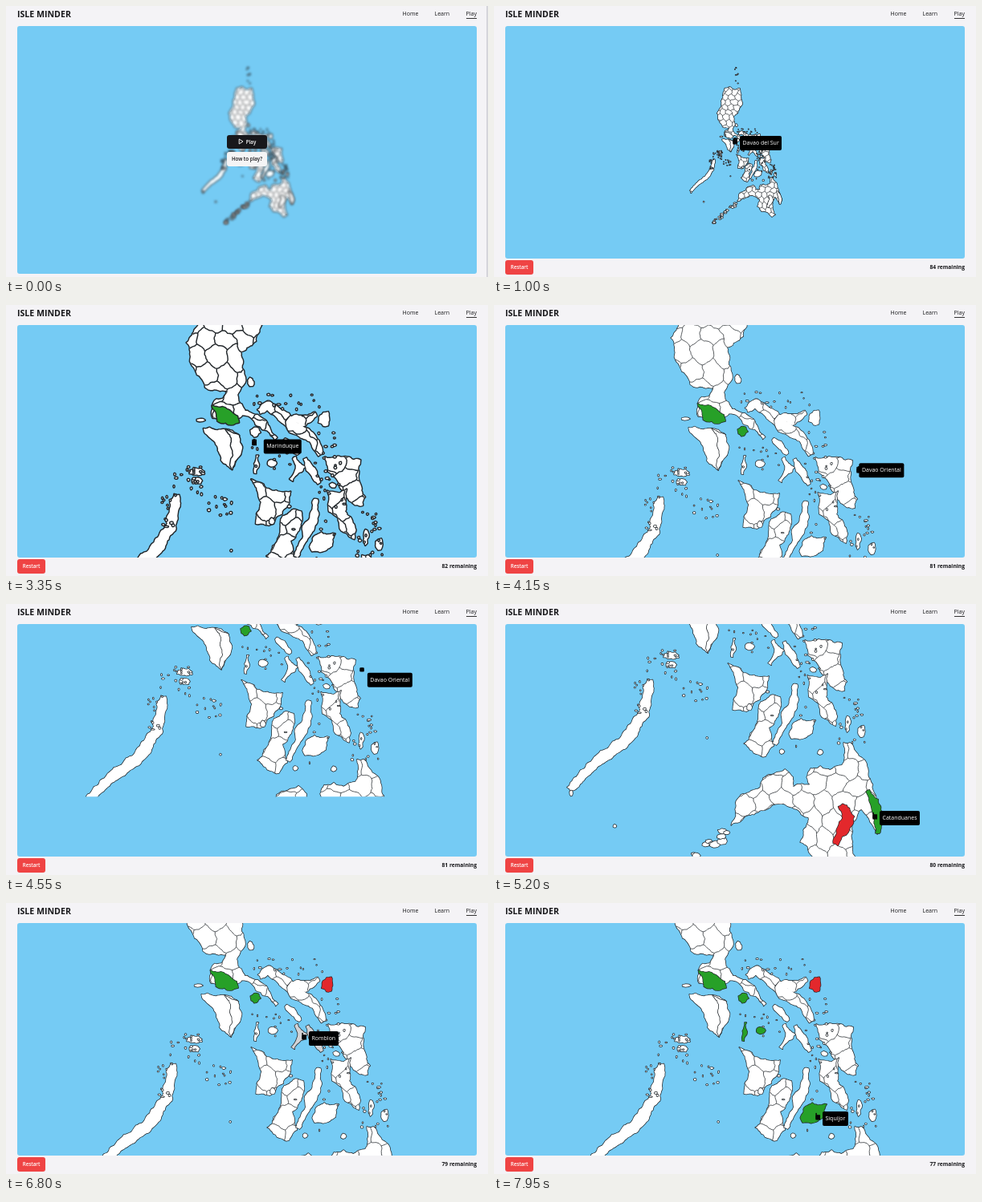
An HTML page with a canvas for the animation above (8000 ms loop, 600 by 338 pixels).

```html
<!DOCTYPE html>
<html lang="en">
<head>
<meta charset="utf-8">
<title>Isle Minder</title>
<style>
  html, body { margin: 0; width: 100%; height: 100%; overflow: hidden; background: #f4f3f6; }
  body { font: 7px/10px "Open Sans", "Noto Sans", sans-serif; color: #18181b; }
  canvas { position: absolute; left: 0; top: 0; width: 600px; height: 338px; }
  body > div { position: absolute; white-space: nowrap; }
  .title { left: 14px; top: 3px; font-size: 10.6px; line-height: 14px; font-weight: 700; }
  .nav { top: 5px; }
  .rule { left: 573px; top: 15px; width: 13px; height: 1px; background: #333; }
  .button { box-sizing: border-box; border-radius: 3px; height: 17.5px; line-height: 17.5px; text-align: center; font-weight: 600; font-size: 6.2px; }
  .restart { left: 14px; top: 317px; width: 35px; background: #ef4444; color: #fff; }
  .play { left: 275px; top: 160.5px; width: 50px; padding-left: 10px; background: #18181b; color: #fff; }
  .play svg { position: absolute; left: 14px; top: 4.5px; }
  .how { left: 275px; top: 182px; width: 50px; background: #f4f4f5; }
  .count { right: calc(100% - 586px); top: 321px; font-weight: 700; font-size: 6.7px; }
  .label { left: 0; top: 0; height: 17.5px; line-height: 17.5px; padding: 0 3.5px; border-radius: 2px; background: #000; color: #fff; }
  .edge { left: 598px; top: 0; width: 2px; height: 338px; background: #d5d5da; }
</style>
</head>
<body>
<canvas id="map"></canvas>
<div class="title">ISLE MINDER</div>
<div class="nav" style="left:493.5px">Home</div>
<div class="nav" style="left:533.5px">Learn</div>
<div class="nav" style="left:572.5px">Play</div>
<div class="rule"></div>
<div class="button restart game">Restart</div>
<div class="count game" id="count"></div>
<div class="label game" id="label"></div>
<div class="button play intro"><svg width="7" height="8"><path d="M1.2 1 L6 4 L1.2 7 Z" fill="none" stroke="#fff" stroke-width=".9" stroke-linejoin="round"/></svg>Play</div>
<div class="button how intro">How to play?</div>
<div class="edge intro"></div>
<script>
const LOOP = 8000, START = 600, TOTAL = 84, LAG = 50, ZOOM_TIME = 270;
const GREEN = '#27a028', RED = '#e3282c', SEA = '#75cbf4';
const canvas = document.getElementById('map'), ctx = canvas.getContext('2d');
const count = document.getElementById('count'), label = document.getElementById('label');
const dpr = window.devicePixelRatio || 1;
canvas.width = 600 * dpr;
canvas.height = 338 * dpr;

let seed = 7;
const rnd = () => (seed = seed * 16807 % 2147483647) / 2147483647;
const spread = size => (rnd() - .5) * size;

// Outline makers: key points, a tapered band along a spine, an uneven ellipse.
const ring = text => text.trim().split(/\s+/).map(p => p.split(',').map(Number));
function band(text, width) {
  const spine = ring(text), last = spine.length - 1, left = [], right = [];
  spine.forEach(([x, y], i) => {
    const a = spine[Math.max(0, i - 1)], b = spine[Math.min(last, i + 1)];
    const dx = b[0] - a[0], dy = b[1] - a[1];
    const w = width * (.4 + .6 * Math.sin(Math.PI * i / last)) / Math.hypot(dx, dy);
    left.push([x - dy * w, y + dx * w]);
    right.unshift([x + dy * w, y - dx * w]);
  });
  return left.concat(right);
}
function blob(x, y, rx, ry = rx) {
  return Array.from({ length: 7 }, (_, i) => {
    const a = i * Math.PI * 2 / 7, d = .8 + rnd() * .4;
    return [x + rx * d * Math.cos(a), y + ry * d * Math.sin(a)];
  });
}

// Midpoint displacement gives the ragged shore.
function shore(path, x, y, u, v) {
  const len = Math.hypot(u - x, v - y);
  if (len < 4) return path.lineTo(u, v);
  const size = Math.min(.3 * len, 5);
  const mx = (x + u) / 2 + spread(size), my = (y + v) / 2 + spread(size);
  shore(path, x, y, mx, my);
  shore(path, mx, my, u, v);
}
function outline(points) {
  const path = new Path2D();
  path.moveTo(...points[0]);
  points.forEach((p, i) => shore(path, ...p, ...points[(i + 1) % points.length]));
  path.closePath();
  return path;
}
const isles = [];
const isle = (name, split, ...rings) => isles.push({ name, split, parts: rings.map(outline) });
function scatter(x, y, w, h, n) {
  while (n--) isle('', false, blob(x + spread(w), y + spread(h), .4 + rnd() * rnd() * 2, .3 + rnd()));
}

isle('Luzon', true,
  ring(`255,-104 275,-111 299,-97 320,-104 330,-35 312,0 292,14 298,54 288,70 298,90 286,105 256,100
    256,82 270,74 275,64 246,60 228,30 222,2 238,-22 240,-50 248,-70`),
  band('290,92 312,100 324,112 338,127', 5),
  band('316,92 328,84 350,100 364,114 384,126 396,148', 8),
  band('350,102 372,104 390,95', 7));
isle('Batangas', false, ring('255,84 272,87 288,98 290,106 280,109 262,104'));
isle('Mindoro', false, ring('244,114 273,115 290,123 292,148 281,167 270,159 262,137'));
isle('Mindoro', false, ring('273,115 290,123 292,148 281,167 280,133'));
isle('', false, blob(240, 103, 5, 2));
isle('', false, blob(305, 53, 4, 6));
isle('Marinduque', false, blob(311, 119, 6));
isle('Romblon', false, band('314,149 313,160 311,172', 3), blob(333, 159, 5, 4));
isle('Catanduanes', false, blob(401, 101, 7, 10));
isle('Masbate', false, band('362,152 370,163 358,181', 6), band('376,153 382,166 394,185', 5));
isle('', false, band('349,128 358,136 367,147', 4));
isle('Palawan', false, band('108,337 131,315 150,297 168,283 188,262 201,244 205,224 209,200', 8));
isle('', false, blob(111, 342, 2, 4));
isle('', false, blob(235, 170, 9, 5));
isle('', false, blob(235, 182, 7, 4));
isle('Panay', true, ring('306,180 333,195 357,196 355,207 346,225 329,240 312,238 313,225 319,210'));
isle('', false, blob(333, 235, 3, 4));
isle('Negros', true, ring('347,228 359,220 371,222 371,236 357,260 363,283 353,296 341,293 326,280 343,252'));
isle('Cebu', false, band('390,206 388,226 378,250 364,281', 6));
isle('Bohol', false, ring('382,268 387,255 397,249 415,251 411,267 402,273 385,274'));
isle('Siquijor', false, blob(373, 290, 3));
isle('Camiguin', false, blob(421, 291, 3));
isle('Samar', true, ring('402,151 431,151 448,155 446,170 454,203 451,214 438,211 421,190 416,178 406,170'));
isle('Leyte', true, ring('405,195 421,198 430,193 428,222 442,246 440,258 423,247 419,230 407,222'));
isle('', false, blob(412, 188, 4, 3));
isle('', false, blob(455, 255, 3, 11));
isle('', false, blob(472, 265, 4, 8));
isle('Mindanao', true, ring(`315,362 322,344 346,335 350,323 377,312 387,322 387,334 408,331 404,322 409,311
  421,308 433,313 448,307 450,279 458,279 473,298 484,328 490,345 499,379 492,393 472,362 461,379 461,410
  472,438 458,448 437,427 413,424 396,403 406,372 375,355 334,369 310,382`));
isle('Davao Oriental', false, band('480,339 488,352 494,370 492,392', 6));
isle('Davao del Sur', false, band('446,357 456,372 450,386 440,406', 8));

scatter(305, -160, 16, 70, 8);
scatter(350, 80, 90, 22, 16);
scatter(265, 214, 32, 26, 12);
scatter(225, 182, 40, 40, 22);
scatter(198, 222, 20, 46, 14);
scatter(330, 150, 60, 44, 12);
scatter(405, 160, 34, 90, 24);
scatter(460, 250, 34, 60, 22);
scatter(390, 245, 80, 80, 10);
isle('', false, blob(280, 273, 1));
isle('', false, blob(165, 383, 2));
for (let i = 0; i < 28; i++) {
  const p = i / 27, r = 2 + rnd() * 5;
  isle('', false, blob(206 + 100 * p + spread(16), 474 - 88 * p + spread(16), r, r * .6));
}

// Province borders: a shaken honeycomb, shown only on the larger isles.
const borders = new Path2D();
const shake = n => (Math.sin(n * 12.99) * 43758.5 % 1) * 5;
const knot = (i, j) => [
  206 + i * 13 + shake(i + j * 57),
  -120 + j * 22 + ((i + j) % 2 ? 4 : -4) + shake(i * 31 + j + .5)
];
for (let i = 0; i < 24; i++) for (let j = 0; j < 27; j++) {
  const ends = (i + j) % 2 ? [knot(i + 1, j), knot(i, j + 1)] : [knot(i + 1, j)];
  for (const end of ends) {
    borders.moveTo(...knot(i, j));
    shore(borders, ...knot(i, j), ...end);
  }
}

// Time, place asked for, colour it gets.
const turns = [
  [1600, 'Davao del Sur', RED], [2900, 'Batangas', GREEN], [3750, 'Marinduque', GREEN],
  [5200, 'Davao Oriental', GREEN], [6400, 'Catanduanes', RED], [7250, 'Romblon', GREEN],
  [7720, 'Bohol', GREEN], [Infinity, 'Siquijor', GREEN]
];
const zooms = [{ from: 2290, scale: .5 }, { from: 3160, scale: 1 }];
const moves = [];
const move = (from, to, x, y, more) => moves.push({ from, to, x, y, bend: 0, ...more });
move(0, 1, 300, 169);
move(1200, 1500, 338, 235);
move(1700, 1950, 347, 259);
move(2100, 2280, 281, 165);
move(2650, 2850, 300, 159);
move(2950, 3130, 330, 181);
move(3230, 3400, 307, 171);
move(3450, 3650, 308, 158);
move(3900, 4150, 454, 206);
move(4206, 4761, 441, 61, { drag: true });
move(4850, 5100, 474, 265);
move(5400, 5700, 493, 139);
move(5772, 6007, 507, 245, { drag: true, bend: 28 });
move(6200, 6350, 420, 180);
move(6500, 6700, 371, 167);
move(6950, 7150, 332, 160);
move(7350, 7600, 403, 267);
const drags = moves.filter(m => m.drag);

const easeOut = p => 1 - (1 - Math.max(0, Math.min(1, p))) ** 2;
function pointer(t) {
  let x = 0, y = 0;
  for (const m of moves) {
    if (t < m.from) break;
    const e = easeOut((t - m.from) / (m.to - m.from));
    x += (m.x - x) * e + m.bend * 4 * e * (1 - e);
    y += (m.y - y) * e;
  }
  return [x, y];
}
function dragged(drag, t) {
  const a = pointer(drag.from), b = pointer(Math.min(t, drag.to));
  return [b[0] - a[0], b[1] - a[1]];
}

// Zooms hold the point under the pointer; drags follow the pointer.
function viewAt(t) {
  let s = .29, x = 213.2, y = 133.1, drawn = s;
  for (const z of zooms.filter(z => t >= z.from)) {
    const [px, py] = pointer(z.from), p = (t - z.from) / ZOOM_TIME;
    const next = s + (z.scale - s) * easeOut(p), k = next / s;
    x = px + (x - px) * k;
    y = py + (y - py) * k;
    s = next;
    if (p >= 1) drawn = s;
  }
  for (const d of drags.filter(d => t >= d.from)) {
    const [dx, dy] = dragged(d, t);
    x += dx;
    y += dy;
  }
  return { s, x, y, drawn };
}

function drawMap(t, pos, drag) {
  const playing = t >= START;
  const { s, x, y, drawn } = viewAt(t);
  ctx.save();
  ctx.beginPath();
  ctx.roundRect(14, 25, 572, playing ? 290 : 309, 3);
  ctx.clip();
  ctx.fillStyle = SEA;
  ctx.fillRect(14, 25, 572, 310);
  if (drag) {
    // Only a margin around the old view is drawn until the drag ends.
    const [dx, dy] = dragged(drag, t), pad = 49.5;
    ctx.beginPath();
    ctx.rect(14 - 2 * pad + dx, 25 - pad + dy, 572 + 4 * pad, 290 + 2 * pad);
    ctx.clip();
  }
  if (!playing) ctx.filter = `blur(${1.5 * dpr}px)`;
  ctx.translate(x, y);
  ctx.scale(s, s);
  ctx.lineJoin = 'round';
  ctx.strokeStyle = '#22272b';
  let hover = false;
  const paint = (land, fill) => {
    ctx.fillStyle = fill;
    ctx.lineWidth = 1.5 / drawn;
    land.parts.forEach(p => ctx.stroke(p));
    land.parts.forEach(p => ctx.fill(p));
    if (!land.split) return;
    ctx.lineWidth = .75 / drawn;
    for (const part of land.parts) {
      ctx.save();
      ctx.clip(part);
      ctx.stroke(borders);
      ctx.restore();
    }
  };
  const marked = [];
  for (const land of isles) {
    const turn = turns.find(k => k[1] === land.name && t >= k[0]);
    const over = playing && !drag && land.name && !land.split &&
      land.parts.some(p => ctx.isPointInPath(p, pos[0] * dpr, pos[1] * dpr));
    hover = hover || over;
    if (turn) marked.push([land, turn[2]]);
    else paint(land, over ? '#d3d3d5' : '#fff');
  }
  marked.forEach(args => paint(...args));
  ctx.restore();
  return hover;
}

function drawHand([x, y], hover, drag) {
  ctx.save();
  ctx.translate(x, y);
  ctx.fillStyle = ctx.strokeStyle = '#050505';
  ctx.lineCap = 'round';
  ctx.lineWidth = 1.5;
  ctx.beginPath();
  ctx.roundRect(-2.6, -2.4, 5.6, 5.2, 1.4);
  ctx.fill();
  for (let i = 0; i < 4 && !drag; i++) {
    const tip = hover ? (i ? -2 : -4.5) : -3.5 - Math.sin(i);
    ctx.beginPath();
    ctx.moveTo(-1.9 + i * 1.4, 3);
    ctx.lineTo(-1.9 + i * 1.4, tip);
    ctx.stroke();
  }
  ctx.restore();
}

function show(kind, on) {
  document.querySelectorAll('.' + kind).forEach(e => e.style.visibility = on ? 'visible' : 'hidden');
}

const begin = performance.now();
function frame() {
  const t = (performance.now() - begin) % LOOP;
  const playing = t >= START;
  const pos = pointer(t), drag = drags.find(d => t >= d.from && t < d.to);
  ctx.setTransform(dpr, 0, 0, dpr, 0, 0);
  ctx.clearRect(0, 0, 600, 338);
  const hover = drawMap(t, pos, drag);
  if (playing) drawHand(pos, hover, drag);
  show('game', playing);
  show('intro', !playing);
  const done = turns.filter(k => t >= k[0]).length;
  count.textContent = `${TOTAL - done} remaining`;
  label.textContent = turns[done][1];
  const [lx, ly] = pointer(t - LAG);
  label.style.transform = `translate(${lx + 6}px, ${ly - 7}px)`;
  requestAnimationFrame(frame);
}
frame();
</script>
</body>
</html>
```
